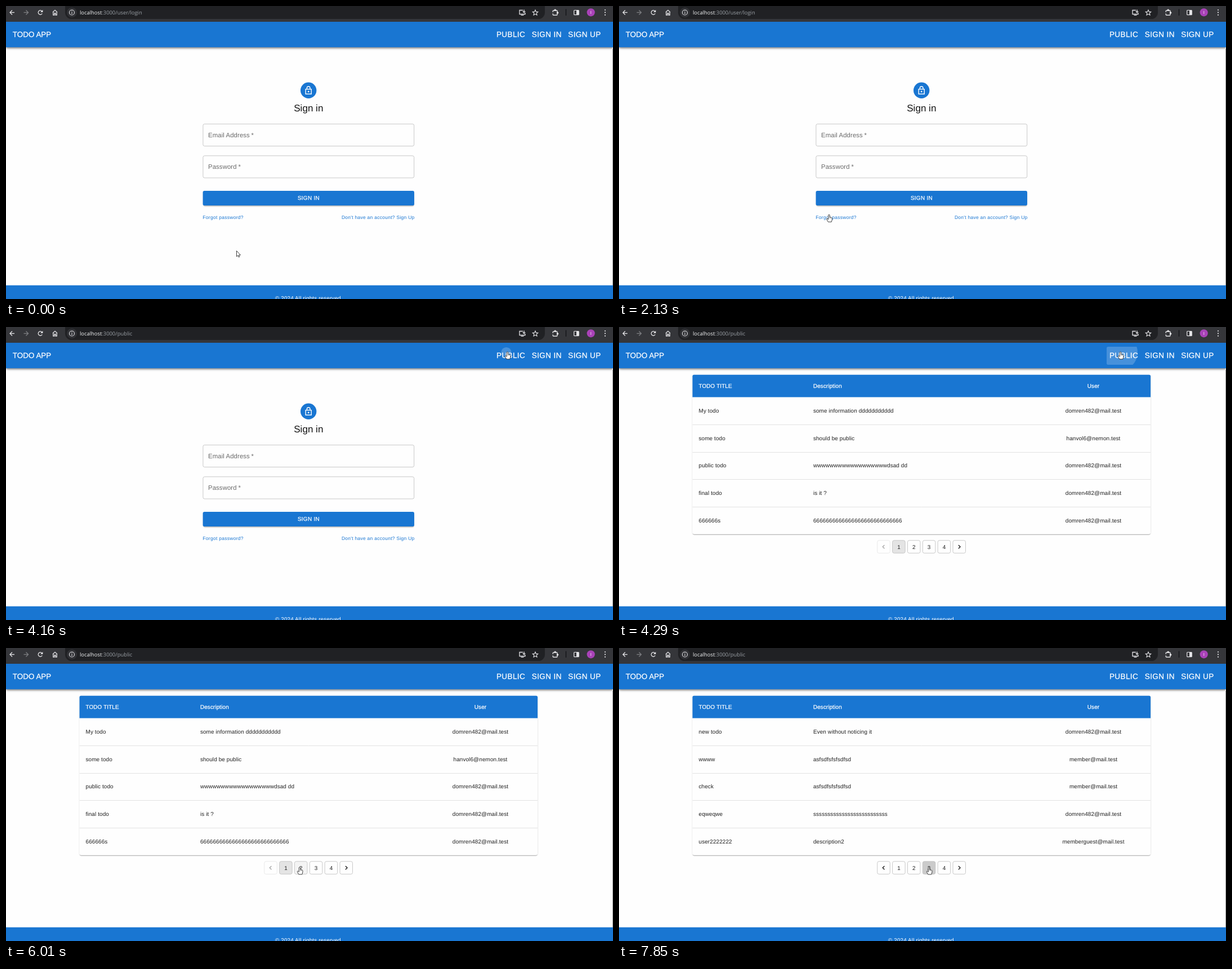
Recreate the animation shown at these times as an HTML page with a canvas. Size 1078 px wide and 520 px high, loop 8 s.

```html
<!DOCTYPE html>
<html lang="en">
<head>
<meta charset="utf-8">
<title>Todo app</title>
<style>
html, body { margin: 0; width: 100%; height: 100%; overflow: hidden; background: #fefefe; }
canvas { display: block; width: 1078px; height: 520px; }
</style>
</head>
<body>
<canvas id="stage"></canvas>
<script>
const W = 1078, H = 520, LOOP = 8000;
const STEP = 130; // the pointer is refreshed once per step
const BLUE = '#1976d2', INK = '#212121', ICON = '#e3e3e6';
const SANS = '"Liberation Sans", Arial, sans-serif';
const BODY = 9.95;

const canvas = document.getElementById('stage');
const dpr = window.devicePixelRatio || 1;
canvas.width = W * dpr;
canvas.height = H * dpr;
const ctx = canvas.getContext('2d');

// Pointer moves: begin, end, x, y. Each one eases out towards its goal.
const moves = [
  [0, 1, 409.5, 434.5],
  [750, 1250, 113.5, 91.5],
  [1300, 1560, 520.5, 307],
  [1690, 2080, 373, 370],
  [2080, 2400, 422.5, 374],
  [2400, 2860, 529.5, 347.5],
  [3100, 3650, 890.5, 43.8],
  [4600, 5330, 507.5, 385.5],
  [5450, 5700, 521.5, 388.6],
  [6500, 6800, 550.5, 388.7]
];

const NAV_CLICK = 4155, TABLE_AT = 4285;
const pageClicks = [-LOOP, 6385, 7605];

const DOM = 'domren482@mail.test', HAN = 'hanvol6@nemon.test', MEM = 'member@mail.test';
const pages = [
  [['My todo', 'some information ' + 'd'.repeat(11), DOM],
   ['some todo', 'should be public', HAN],
   ['public todo', 'w'.repeat(18) + 'dsad dd', DOM],
   ['final todo', 'is it ?', DOM],
   ['666666s', '6'.repeat(28), DOM]],
  [['next todo', 'some description', DOM],
   ['todo title', 'public information', DOM],
   ['test', 'test description', HAN],
   ['one more', 'ddddddddddddd', DOM],
   ['todo 10', 'should be visible', DOM]],
  [['new todo', 'Even without noticing it', DOM],
   ['wwww', 'asfsdfsfsfsdfsd', MEM],
   ['check', 'asfsdfsfsfsdfsd', MEM],
   ['eqweqwe', 's'.repeat(26), DOM],
   ['user2222222', 'description2', 'memberguest@mail.test']]
];

const clamp = v => Math.max(0, Math.min(1, v));
const ramp = (t, a, b) => clamp((t - a) / (b - a));
const between = (t, a, b) => t >= a && t < b;
const easeOut = k => 1 - (1 - k) ** 2;
const black = a => `rgba(0,0,0,${a})`;

// Pointer state, refreshed by every draw.
let mouse = { x: 0, y: 0, hand: false };

function moveMouse(now) {
  const t = Math.floor(now / STEP) * STEP;
  let [, , x, y] = moves[0];
  for (const [a, b, goalX, goalY] of moves) {
    const k = easeOut(ramp(t, a, b));
    x += (goalX - x) * k;
    y += (goalY - y) * k;
  }
  mouse = { x, y, hand: false };
}

const over = (x, y, w, h) => between(mouse.x, x, x + w) && between(mouse.y, y, y + h);

function hot(...area) {
  const hit = over(...area);
  mouse.hand ||= hit;
  return hit;
}

function text(str, x, y, size, color, { em = 0.0107, align = 'left', font = SANS, medium = false } = {}) {
  ctx.font = `${size}px ${font}`;
  ctx.letterSpacing = `${size * em}px`;
  ctx.textRendering = 'geometricPrecision';
  ctx.textAlign = align;
  ctx.fillStyle = color;
  ctx.fillText(str, x, y);
  if (medium) {
    ctx.strokeStyle = color;
    ctx.lineWidth = 0.25;
    ctx.strokeText(str, x, y);
  }
}

function box(x, y, w, h, r) {
  ctx.beginPath();
  ctx.roundRect(x, y, w, h, r);
}

function fillBox(x, y, w, h, r, color) {
  box(x, y, w, h, r);
  ctx.fillStyle = color;
  ctx.fill();
}

function strokeBox(x, y, w, h, r, color, width) {
  box(x, y, w, h, r);
  ctx.strokeStyle = color;
  ctx.lineWidth = width;
  ctx.stroke();
}

function shadow(x, y, w, h, dy, blur, alpha) {
  ctx.save();
  ctx.shadowColor = black(alpha);
  ctx.shadowOffsetY = dy * dpr;
  ctx.shadowBlur = blur * dpr;
  fillBox(x, y, w, h, 3, '#fff');
  ctx.restore();
}

function disc(x, y, r, color) {
  ctx.beginPath();
  ctx.arc(x, y, r, 0, 7);
  ctx.fillStyle = color;
  ctx.fill();
}

function line(points, color = ICON, width = 1.3, close = false) {
  ctx.beginPath();
  points.forEach(([x, y]) => ctx.lineTo(x, y));
  if (close) ctx.closePath();
  ctx.strokeStyle = color;
  ctx.lineWidth = width;
  ctx.stroke();
}

function ring(x, y, r, from = 0, to = 7, width = 1.2) {
  ctx.beginPath();
  ctx.arc(x, y, r, from, to);
  ctx.strokeStyle = ICON;
  ctx.lineWidth = width;
  ctx.stroke();
}

// Click ripple that stays inside the given button.
function ripple([x, y, w, h], cx, cy, r, color) {
  ctx.save();
  box(x, y, w, h, 2.8);
  ctx.clip();
  disc(cx, cy, r, color);
  ctx.restore();
}

function arrow(x, dir, color) {
  line([[x - 4 * dir, 11.5], [x + 4 * dir, 11.5]], color);
  line([[x, 7.5], [x + 4 * dir, 11.5], [x, 15.5]], color);
}

function browserBar(url) {
  ctx.fillStyle = '#35363a';
  ctx.fillRect(0, 0, W, 28);
  fillBox(105, 0, 852, 23, [0, 0, 11.5, 11.5], '#202124');

  arrow(11, -1, ICON);
  arrow(35.5, 1, '#7d7e82');
  ring(61, 11.5, 3.7, 0.5, 5.5, 1.4);
  ctx.fillStyle = ICON;
  ctx.beginPath();
  ctx.moveTo(65.4, 6.8);
  ctx.lineTo(65.4, 11);
  ctx.lineTo(61.2, 11);
  ctx.fill();
  line([[83, 11], [87, 7.3], [91, 11]]);
  line([[83.8, 10.8], [83.8, 16], [86, 16], [86, 12.6], [88, 12.6], [88, 16], [90.2, 16], [90.2, 10.8]]);

  disc(117, 11.5, 9, '#303135');
  ring(117, 11.5, 4.5, 0, 7, 1.1);
  line([[117, 11], [117, 14]], ICON, 1.2);
  disc(117, 9.3, 0.7, ICON);

  const style = { em: 0, font: '"Open Sans", "Noto Sans", sans-serif' };
  text('localhost', 131, 15.3, 9.4, '#f1f3f4', style);
  const x = 131 + ctx.measureText('localhost').width;
  text(':3000' + url, x, 15.3, 9.4, '#9aa0a6', style);

  line([[918, 7.5], [912, 7.5], [912, 14.5], [922, 14.5], [922, 12]]);
  line([[914.5, 16.3], [919.5, 16.3]]);
  line([[920, 6.5], [920, 11.5]]);
  line([[917.8, 9.5], [920, 11.7], [922.2, 9.5]]);
  line(Array.from({ length: 10 }, (_, i) => {
    const a = i * Math.PI / 5, r = i % 2 ? 2.3 : 5;
    return [940 + r * Math.sin(a), 12 - r * Math.cos(a)];
  }), ICON, 1.1, true);

  strokeBox(971.3, 8, 7.7, 8.3, 1, ICON, 1.4);
  disc(975.2, 7.3, 1.8, ICON);
  disc(979.6, 12, 1.8, ICON);
  disc(971.3, 12.2, 1.4, '#35363a');
  line([[994.5, 5.5], [994.5, 17]], '#111214', 1.2);
  strokeBox(1008.7, 7.5, 8.6, 8.2, 1, ICON, 1.2);
  ctx.fillStyle = ICON;
  ctx.fillRect(1013, 7.5, 4.3, 8.2);
  disc(1038.7, 11.3, 7.1, '#a942b8');
  text('I', 1038.7, 14, 7.5, '#fff', { em: 0, align: 'center' });
  for (let i = 0; i < 3; i++) disc(1064, 7 + i * 4.4, 1.1, ICON);
}

function appBar(t) {
  shadow(0, 28, W, 45, 2.2, 3, 0.34);
  shadow(0, 28, W, 45, 1.5, 5, 0.2);
  ctx.fillStyle = BLUE;
  ctx.fillRect(0, 28, W, 45.2);
  ctx.fillStyle = black(0.25);
  ctx.fillRect(0, 27, W, 1);

  text('TODO APP', 11.7, 55.3, 13.4, '#fff', { em: 0.004, medium: true });
  [['PUBLIC', 870.9], ['SIGN IN', 933.8], ['SIGN UP', 998.3]].forEach(([s, x]) =>
    text(s, x, 55.3, 13.55, '#fff', { em: 0.0286, medium: true }));

  const publicLink = [866, 35, 56.5, 32];
  hot(...publicLink);
  if (between(t, NAV_CLICK, 4580)) {
    const alpha = 0.2 * (1 - ramp(t, 4330, 4580));
    ripple(publicLink, 888.5, 45, 8 + (t - NAV_CLICK) * 0.18, `rgba(255,255,255,${alpha})`);
  }
}

function footer() {
  ctx.fillStyle = BLUE;
  ctx.fillRect(0, 495.7, W, 25);
  text('© 2024 All rights reserved', 536.3, 522, BODY, '#fff', { align: 'center' });
}

function field(label, starX, y) {
  const hover = over(349.9, y, 374.8, 42);
  strokeBox(349.9, y, 374.8, 39.2, 2.8, hover ? INK : '#c2c2c2', 0.9);
  text(label, 359, y + 23.2, 11.35, '#6a6a6a', { em: 0.0094 });
  text('*', starX, y + 23.2, 11.35, '#6a6a6a');
}

function loginPage() {
  disc(537.2, 149.8, 14.2, BLUE);
  ctx.strokeStyle = '#fff';
  ctx.lineWidth = 1.4;
  ctx.strokeRect(532.2, 147.6, 10, 8.6);
  ctx.beginPath();
  ctx.moveTo(534.4, 147.5);
  ctx.lineTo(534.4, 145.6);
  ctx.arc(537.2, 145.6, 2.8, Math.PI, 0);
  ctx.lineTo(540, 147.5);
  ctx.stroke();
  disc(537.2, 151.9, 1.4, '#fff');
  text('Sign in', 537.3, 186.6, 17.07, '#141414', { em: 0, align: 'center' });

  field('Email Address', 435.6, 209.4);
  field('Password', 412.4, 265.8);

  const button = [349.6, 328, 375.4, 26];
  const hover = hot(...button);
  shadow(350.5, 329, 374, 25, hover ? 2.2 : 1.4, hover ? 3.4 : 1.8, 0.3);
  fillBox(...button, 2.8, hover ? '#1565c0' : BLUE);
  text('SIGN IN', 537.4, 344.3, BODY, '#fff', { em: 0.0286, align: 'center', medium: true });

  hot(349, 370, 73, 12);
  text('Forgot password?', 349.3, 377.6, 8.5, BLUE, { em: 0.0333 });
  text("Don't have an account? Sign Up", 725.6, 377.6, 8.5, BLUE, { em: 0.0315, align: 'right' });
}

function pageButton(t, i) {
  const cx = 496.9 + i * 26.84, size = 22.5;
  const area = [cx - size / 2, 378.8, size, size];
  const hover = hot(...area);
  const off = i < 0 && t < pageClicks[1];
  if (i in pageClicks) {
    const on = ramp(t, pageClicks[i], pageClicks[i] + 200);
    const next = pageClicks[i + 1] ?? LOOP;
    const shade = 0.1 * on * (1 - ramp(t, next, next + 200)) + (hover ? 0.04 : 0);
    fillBox(...area, 2.8, black(shade));
    const age = t - pageClicks[i];
    if (age < 450) {
      ripple(area, cx, 390, Math.max(0, 6 + age * 0.07), black(age < 0 ? 0 : 0.07 * (1 - ramp(age, 250, 450))));
    }
  }
  strokeBox(...area, 2.8, off ? '#e6e6e6' : '#c0c0c0', 0.85);
  if (between(i, 0, 4)) {
    text(String(i + 1), cx, 393.6, BODY, INK, { em: 0, align: 'center' });
  } else {
    const d = i < 0 ? -1 : 1;
    line([[cx - 1.4 * d, 386.9], [cx + 1.8 * d, 390.1], [cx - 1.4 * d, 393.3]], off ? '#a8a8a8' : INK, 1.4);
  }
}

function tableRow(row, y, color, medium) {
  text(row[0], 141.5, y, BODY, color, { medium });
  text(row[1], 344.9, y, BODY, color, { medium });
  text(row[2], 842.5, y, BODY, color, { medium, align: 'center' });
}

function tablePage(t) {
  const page = pageClicks.filter(c => t >= c).length - 1;
  const x = 130.5, w = 813.6, top = 84.8, h = 282.6, first = 124.4;
  shadow(x + 0.5, top, w - 1, h, 1.3, 0.8, 0.32);
  shadow(x, top, w, h, 0.7, 2.2, 0.18);
  fillBox(x, top, w, h, 2.8, '#fefefe');
  fillBox(x, top, w, first - top, [2.8, 2.8, 0, 0], BLUE);

  tableRow(['TODO TITLE', 'Description', 'User'], 108, '#fff', true);
  pages[page].forEach((row, i) => {
    const y = first + i * 48.63, edge = Math.round(y) + 0.5;
    tableRow(row, y + 27.7, INK);
    if (i) line([[x, edge], [x + w, edge]], '#e2e2e2', 1);
  });
  for (let i = -1; i <= 4; i++) pageButton(t, i);
}

const arrowShape = new Path2D('M0 0V10.2L2.3 8.1 3.8 11.3 5.3 10.6 3.9 7.5H7Z');
const handShape = new Path2D('M-1.2 1Q0-.8 1.2 1V4.7Q2.2 4 2.8 5.1 3.8 4.6 4.3 5.7 5.4 5.4 5.4 6.8V9.4' +
  'L4.3 13.2H-1.6L-4 9Q-4.7 7.2-2.9 7.3L-1.2 8.8Z');

function pointer() {
  const shape = mouse.hand ? handShape : arrowShape;
  ctx.save();
  ctx.translate(mouse.x, mouse.y);
  ctx.lineJoin = 'round';
  ctx.fillStyle = '#fff';
  ctx.fill(shape);
  ctx.strokeStyle = '#2a2a2a';
  ctx.lineWidth = 0.9;
  ctx.stroke(shape);
  if (mouse.hand) {
    line([[1.2, 4.7], [1.2, 7]], '#555', 0.6);
    line([[2.8, 5.3], [2.8, 7.2]], '#555', 0.6);
  }
  ctx.restore();
}

function draw(t) {
  ctx.setTransform(dpr, 0, 0, dpr, 0, 0);
  ctx.fillStyle = '#fefefe';
  ctx.fillRect(0, 0, W, H);
  moveMouse(t);
  appBar(t);
  browserBar(t < NAV_CLICK ? '/user/login' : '/public');
  if (t < TABLE_AT) loginPage();
  else tablePage(t);
  line([[1077.5, 76], [1077.5, 496]], '#9c9c9c', 1);
  footer();
  pointer();
}

const start = performance.now();
function loop() {
  draw((performance.now() - start) % LOOP);
  requestAnimationFrame(loop);
}
loop();
</script>
</body>
</html>
```
